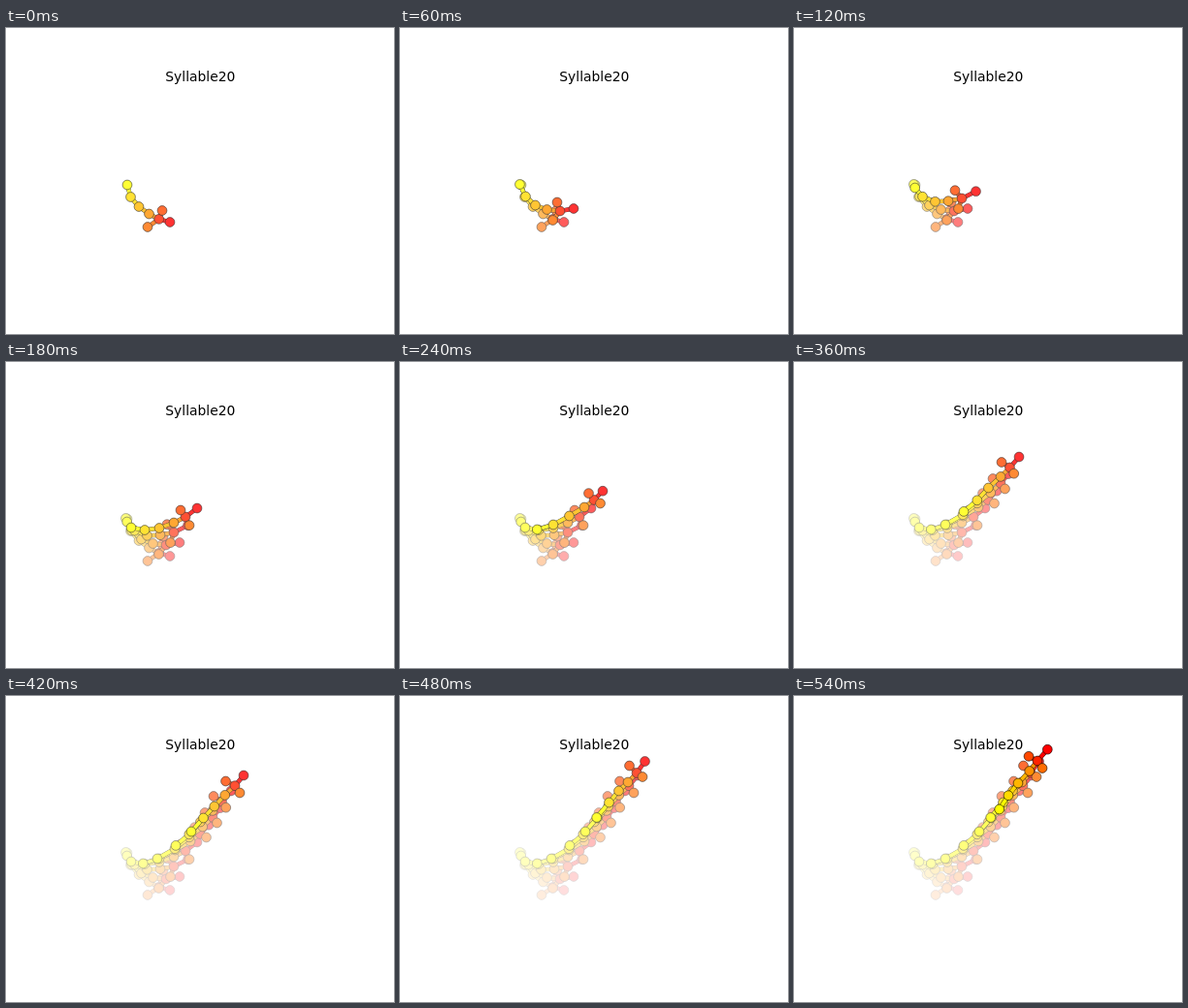
Write an HTML page with a canvas that moves like this. It is 400 px wide and 316 px high and loops after 600 ms.

```html
<!DOCTYPE html>
<html lang="en">
<head>
<meta charset="utf-8">
<title>Syllable20</title>
<style>
  html, body { margin: 0; width: 100%; height: 100%; overflow: hidden; background: #fff; }
  canvas { display: block; }
</style>
</head>
<body>
<canvas id="stage" width="400" height="316"></canvas>
<script>
const ctx = document.getElementById("stage").getContext("2d");
const STEP = 60;
const NODE_RADIUS = 4.9;

// Each pose: x,y of nose, neck, two ears, then the spine down to the tail.
const poses = [
  "169,200.5 157.7,197.4 161,188.5 146,205.5 147.5,192 137,184.5 128.5,174.5 125,162",
  "179,186.5 165,189 162,180 157.5,198.5 151.5,187.5 139.5,183 129.5,174 123.5,161.5",
  "187.5,168.7 173,176 166,167.7 169.5,186.6 159,178.7 145.5,179.3 132.5,174.2 124.7,165",
  "197,151 185,160 180,153 189,168.7 173,166 158,171.5 143,173.5 129,171",
  "209,133.2 200,142.5 194.5,135.6 206.5,146 190,150 174.5,159 158,168 141.3,173",
  "221,115.6 213,125.4 205,120.5 217.5,131 202.7,135 189,145.8 174,157.8 156,168",
  "232,98 222.5,109 214,103.5 226.7,115.2 213,118.4 200.4,130 188.8,142.8 175,154.4",
  "245,82 236,92.7 226.5,88 241,100 225.7,102.4 214.8,114 203.5,126 191,140",
  "252.5,67.5 244,79.5 236.5,72 250,83.5 235,89 225.5,98 215.5,110 202.7,125.5",
  "261.3,55.2 251,67 242,62.3 256,74.5 242.7,77.5 231,90 221,102.7 211.7,117"
].map(pose => pose.split(" ").map(point => point.split(",").map(Number)));

const edges = [[0, 1], [2, 1], [3, 1], [4, 1], [5, 4], [6, 5], [7, 6]];
const color = i => `rgb(255 ${Math.floor(i * 255 / 7)} 0)`;

function drawLine(a, b, width, stroke) {
  ctx.lineWidth = width;
  ctx.strokeStyle = stroke;
  ctx.beginPath();
  ctx.moveTo(...a);
  ctx.lineTo(...b);
  ctx.stroke();
}

function drawPose(pose) {
  for (const [i, j] of edges) {
    drawLine(pose[i], pose[j], 4.5, "#000");
    drawLine(pose[i], pose[j], 3.9, color(i));
  }
  ctx.lineWidth = 0.6;
  ctx.strokeStyle = "#000";
  pose.forEach(([x, y], i) => {
    ctx.fillStyle = color(i);
    ctx.beginPath();
    ctx.arc(x, y, NODE_RADIUS, 0, 2 * Math.PI);
    ctx.fill();
    ctx.stroke();
  });
}

// A translucent white veil after every pose but the last fades the trail.
function drawTrail(last) {
  ctx.fillStyle = "#fff";
  ctx.fillRect(0, 0, 400, 316);
  for (let i = 0; i <= last; i++) {
    drawPose(poses[i]);
    if (i < poses.length - 1) {
      ctx.fillStyle = "rgb(255 255 255 / 0.2)";
      ctx.fillRect(0, 0, 400, 316);
    }
  }
  ctx.fillStyle = "#000";
  ctx.font = "13.89px 'DejaVu Sans', sans-serif";
  ctx.textAlign = "center";
  ctx.fillText("Syllable20", 200.3, 55);
}

let shown = -1;
function tick() {
  const step = Math.floor(performance.now() / STEP) % poses.length;
  if (step !== shown) drawTrail(shown = step);
  requestAnimationFrame(tick);
}
tick();
</script>
</body>
</html>
```
